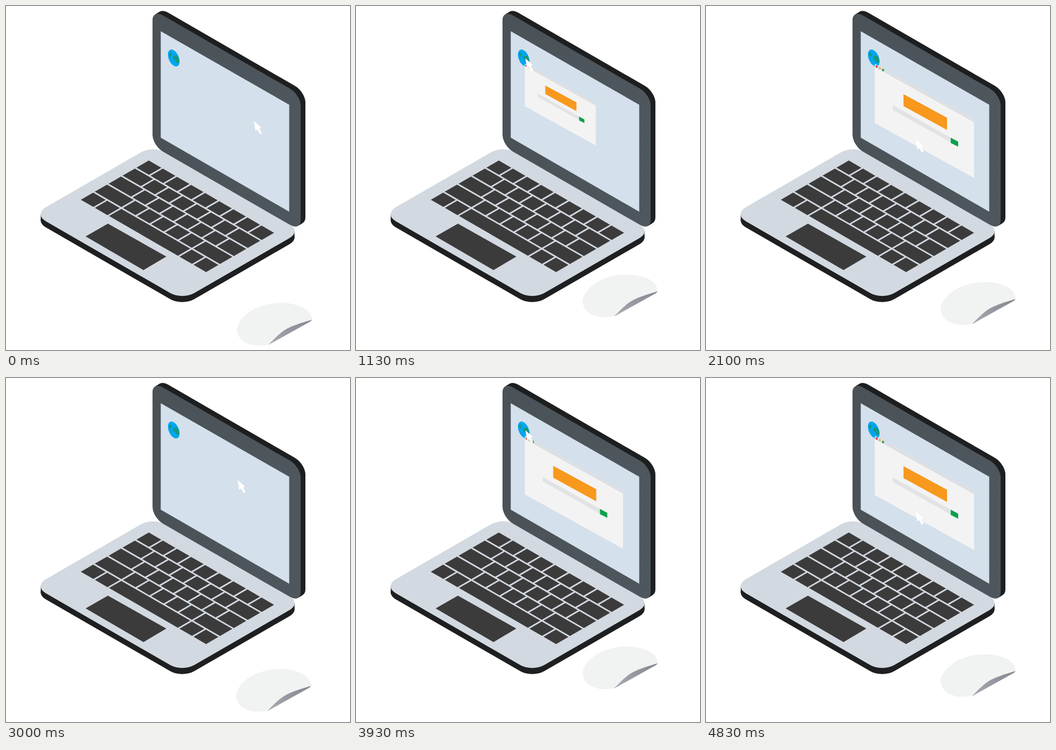
An HTML page that plays this animation: 648 by 648 pixels, repeating every 5.43 s.

```html
<!DOCTYPE html>
<html lang="en">
<head>
<meta charset="utf-8">
<title>Laptop and mouse</title>
<style>
html, body { margin: 0; width: 100%; height: 100%; overflow: hidden; background: #fff; }
svg { display: block; width: 100vw; height: 100vh; }
</style>
</head>
<body>
<svg viewBox="0 0 648 648">
  <defs>
    <linearGradient id="metal" x1="0" y1="0" x2="1" y2="0">
      <stop offset="0" stop-color="#4a5258"/>
      <stop offset="1" stop-color="#4e575d"/>
    </linearGradient>
    <linearGradient id="under" x1="0" y1="1" x2="1" y2="0">
      <stop offset="0" stop-color="#a9abb3"/>
      <stop offset="1" stop-color="#83868f"/>
    </linearGradient>
    <rect id="lid" width="279" height="256.5" rx="20" transform="matrix(1 .577 0 1 276 6.4)"/>
    <rect id="deck" width="323.2" height="259.7" rx="26" transform="matrix(.866 .5 -.866 .5 277 262.4)"/>
  </defs>

  <g fill="#1e1f20">
    <use href="#deck" y="11.5"/>
    <path d="M65.5 393L543.5 424V435.5L65.5 404.5Z"/>
  </g>
  <use href="#deck" fill="#d3d9e0"/>
  <g id="keys" fill="#3c3b3c" transform="matrix(.866 .5 -.866 .5 269 291)"/>
  <path d="M192 410L302 472L259 497.5L150 434Z" fill="#3c3b3c"/>

  <g id="lidEdge" fill="#1e1f20"/>
  <use href="#lid" fill="url(#metal)"/>
  <path d="M291.5 47.5L533.5 186V387.5L291.5 248Z" fill="#d4e0eb"/>

  <g transform="matrix(1 .577 0 1 316 98)">
    <ellipse rx="11" ry="14.6" fill="#00a6ef"/>
    <path d="M-9 -4L-6 -7L-4 -4L-6 1L-8 2ZM-1 -3L3 -6L7 -8Q11 -3 10 3L6 6L3 3L-1 2Z" fill="#17987c"/>
  </g>

  <g id="window">
    <path d="M318 109L505 213V324L318 220.5Z" fill="#f3f3f3"/>
    <path d="M318 109L505 213V219L318 115Z" fill="#dddfe2"/>
    <ellipse cx="321.5" cy="114" rx="2" ry="2.5" fill="#e8413c"/>
    <ellipse cx="327.5" cy="117" rx="2" ry="2.5" fill="#f5b05a"/>
    <ellipse cx="333.5" cy="120.5" rx="2" ry="2.5" fill="#1aa355"/>
    <path d="M372 166L454 210.5V233.5L372 188.5Z" fill="#f8981d"/>
    <path d="M352 187L461 248V257L352 196Z" fill="#e2e3e5"/>
    <path d="M461 248L475 255.5V265L461 258Z" fill="#0da14b"/>
  </g>

  <path id="cursor" d="M0 0L3 18.5L6.5 16.3L11.5 24.8L15 23L10.3 14.5L14 12.5Z" fill="#fff"/>

  <g id="mouse">
    <path d="M576 589Q577 592 572 595L494 638.5L515 612Z" fill="url(#under)"/>
    <path d="M435 609C437 588 466 562 512 559.3C547 557.5 577 571 576 591C556 597 538 602 524 611C511 620 503 630 494 638C474 642 452 639 442 627C437 621 435 615 435 609Z" fill="#f1f2f2"/>
  </g>
</svg>
<script>
const LOOP = 5430, RESTART = 2730, CYCLE = 2715;
const SVG = "http://www.w3.org/2000/svg";
const byId = id => document.getElementById(id);

function add(parent, tag, attrs) {
  const node = document.createElementNS(SVG, tag);
  for (const name in attrs) node.setAttribute(name, attrs[name]);
  parent.append(node);
}

// Key widths per row, in units of one key.
const rows = [
  [1, 1, 1, 1, 1, 1, 1, 1, 1],
  [1.4, 1, 1, 1, 1, 1, 1, 1.6],
  [1.7, 1, 1, 1, 1, 1, 1, 1.3],
  [2, 1, 1, 1, 1, 1, 2],
  [1, 1, 5, 1, 1]
];
const pitch = 30.65, rowPitch = 30.25, gap = 3.4;
rows.forEach((widths, row) => {
  let column = 0;
  for (const width of widths) {
    add(byId("keys"), "rect", {
      x: column * pitch, y: row * rowPitch,
      width: width * pitch - gap, height: rowPitch - gap
    });
    column += width;
  }
});

for (let depth = 9; depth > 0; depth--) {
  add(byId("lidEdge"), "use", { href: "#lid", x: depth, y: -depth * 0.62 });
}

const ease = (t, start, end) => {
  const x = Math.min(1, Math.max(0, (t - start) / (end - start)));
  return (1 - Math.cos(Math.PI * x)) / 2;
};
const place = (id, x, y) => byId(id).setAttribute("transform", `translate(${x} ${y})`);

function draw(time) {
  const t = time < RESTART ? time : time - CYCLE;
  const approach = ease(t, 0, 950);
  const leave = ease(t, 1530, 2115);
  const open = ease(t, 945, 1235);

  place("cursor", 467 - 148 * approach + 76 * leave, 216.5 - 118 * approach + 153 * leave);
  place("mouse", -8 * approach + 15 * leave, -53.5 * approach + 14.5 * leave);
  byId("window").setAttribute("transform",
    `translate(318 109) scale(${open}) translate(-318 -109)`);
  byId("window").setAttribute("visibility", open > 0 ? "visible" : "hidden");
}

function tick() {
  draw(performance.now() % LOOP);
  requestAnimationFrame(tick);
}
tick();
</script>
</body>
</html>
```
